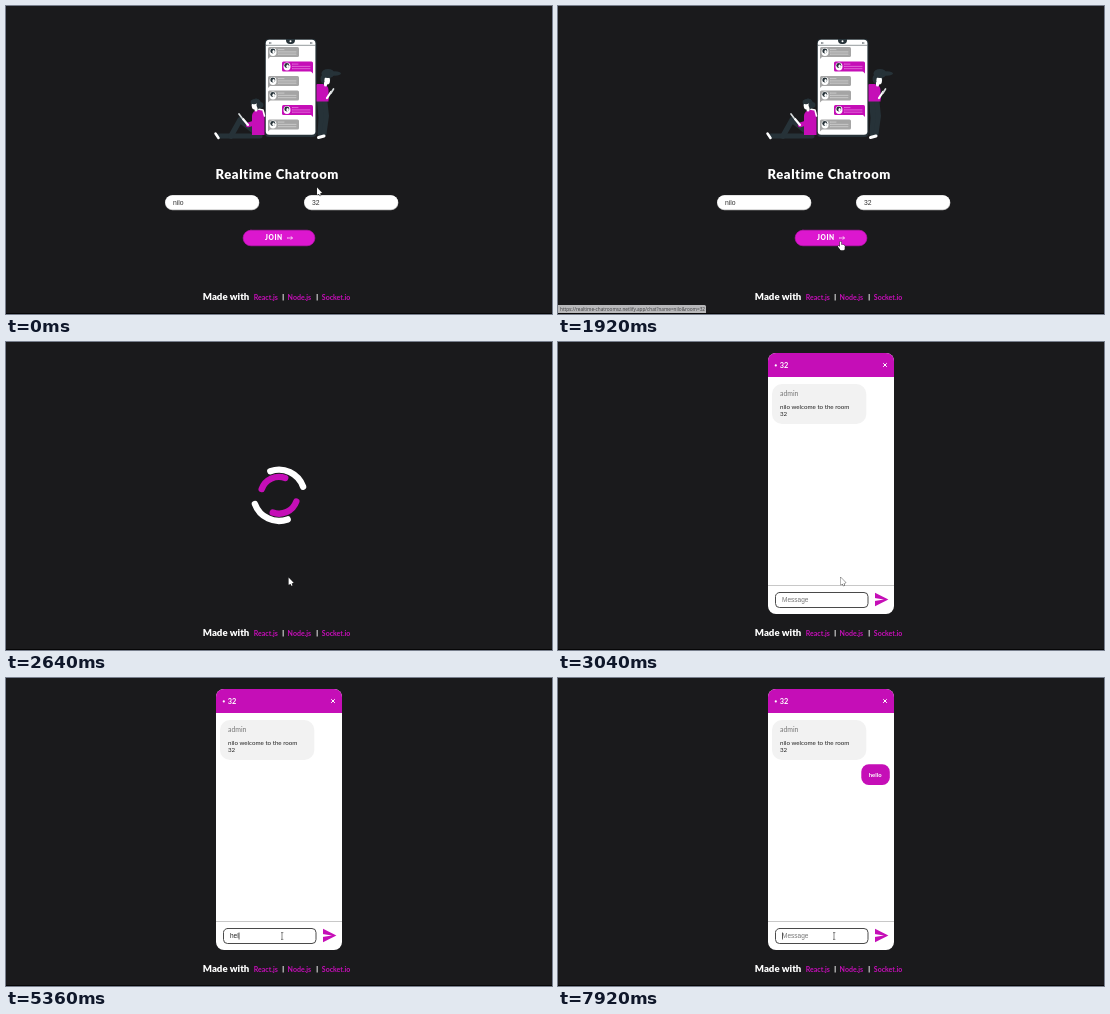
An HTML page with a canvas that plays this animation: 546 px wide and 308 px high, repeating every 8 s.

```html
<!DOCTYPE html>
<html lang="en">
<head>
<meta charset="utf-8">
<title>Realtime Chatroom</title>
<style>
html, body { margin: 0; width: 100%; height: 100%; overflow: hidden; background: #1a1a1c; }
canvas { display: block; width: 546px; height: 308px; }
</style>
</head>
<body>
<canvas id="stage"></canvas>
<script>
const W = 546, H = 308, LOOP = 8000;
const canvas = document.getElementById('stage');
const ctx = canvas.getContext('2d');
const ratio = window.devicePixelRatio || 1;
canvas.width = W * ratio;
canvas.height = H * ratio;

const BG = '#1a1a1c', PINK = '#c50eb7', INK = '#263238', WHITE = '#fff', GREY = '#a5a5a5';
const HUMAN = 'Lato, "Open Sans", sans-serif';
const SANS = '"Liberation Sans", Arial, sans-serif';
const USER = 'nilo', ROOM = '32', WORD = 'hello';

// Times of the events and the pause between keys, in ms
const AT = { status: 1840, loader: 2446, chat: 2880, focus: 4300, type: 4800, send: 6080 };
const KEY_GAP = 210, BLINK = 500;

const clamp = (value, low = 0, high = 1) => Math.min(high, Math.max(low, value));
const mix = (a, b, u) => a + (b - a) * u;

function box(x, y, w, h, r, fill, edge, width = 1) {
  ctx.beginPath();
  ctx.roundRect(x, y, w, h, r);
  ctx.fillStyle = fill;
  ctx.fill();
  if (!edge) return;
  ctx.strokeStyle = edge;
  ctx.lineWidth = width;
  ctx.stroke();
}

function text(str, x, y, font, color, spacing = 0) {
  ctx.font = font;
  ctx.letterSpacing = spacing + 'px';
  ctx.fillStyle = color;
  ctx.fillText(str, x, y);
}

function trace(points) {
  ctx.beginPath();
  points.forEach(([x, y]) => ctx.lineTo(x, y));
}

function poly(fill, ...points) {
  trace(points);
  ctx.fillStyle = fill;
  ctx.fill();
}

function line(color, width, ...points) {
  trace(points);
  ctx.lineCap = ctx.lineJoin = 'round';
  ctx.strokeStyle = color;
  ctx.lineWidth = width;
  ctx.stroke();
}

function oval(x, y, rx, ry, fill, turn = 0) {
  ctx.beginPath();
  ctx.ellipse(x, y, rx, ry, turn, 0, Math.PI * 2);
  ctx.fillStyle = fill;
  ctx.fill();
}

function miniMessage(y, mine) {
  const x = mine ? 276 : 262, fill = mine ? PINK : GREY;
  const tail = mine ? x + 31 : x, inward = mine ? -3 : 3;
  box(x, y, 31, 10, 1.5, fill);
  poly(fill, [tail, y + 8], [tail, y + 12], [tail + inward, y + 9]);
  oval(x + 5, y + 5, 3.5, 3.9, WHITE);
  oval(x + 4.8, y + 4, 2.5, 2.4, INK);
  oval(x + 5.6, y + 4.8, 1.2, 1.7, WHITE);
  for (let i = 0; i < 3; i++) {
    const row = y + 2.6 + i * 2.3;
    line(mine ? '#ee9be8' : '#dedede', 0.6, [x + 10, row], [x + (i ? 28 : 16), row]);
  }
}

function phone() {
  box(259, 33, 51.5, 98, 4, INK);
  box(259.8, 33.8, 49.6, 95, 3.5, WHITE);
  line(INK, 0.5, [260, 39.3], [309, 39.3]);
  line(INK, 0.8, [263, 37], [265, 37]);
  line(INK, 0.8, [304, 37], [306, 37]);
  box(280, 33, 9, 5, [0, 0, 4, 4], INK);
  oval(284.5, 35.2, 1, 1, WHITE);
  for (let i = 0; i < 6; i++) miniMessage(41 + i * 14.5, i % 3 === 1);
}

function head(x, y, tilt) {
  oval(x, y, 5, 5.5, INK);
  oval(x + tilt, y + 1.5, 2.8, 4, WHITE);
  line(WHITE, 3, [x, y + 4], [x, y + 6]);
}

function sitter() {
  line(INK, 5, [254, 130], [213, 130]);
  line(INK, 5.5, [253, 129], [234, 114], [225, 130]);
  line(WHITE, 2.5, [209.5, 127.5], [212.5, 132]);
  box(246, 104, 12.5, 25, [6, 4, 0, 0], PINK);
  line(PINK, 4.5, [249, 109], [248, 117], [242, 119]);
  line(WHITE, 2.2, [242, 119], [237, 113]);
  line('#d7dcdd', 1.7, [233, 108], [236, 112]);
  line(WHITE, 1.6, [252, 103], [257, 104], [258.5, 110]);
  head(250, 98, -1.5);
  oval(254, 99, 3.5, 3, INK);
  oval(249, 95.5, 4.5, 2.5, INK, -0.2);
}

function stander() {
  line(INK, 8, [315, 94], [316.5, 112], [315.5, 127]);
  line(INK, 5, [319, 96], [320.5, 110], [318, 128]);
  line(WHITE, 3, [312.5, 131.5], [318, 130]);
  box(310.5, 78, 12, 17.5, [1, 6, 0, 0], PINK);
  line(PINK, 4, [318, 83], [318, 91], [321, 92]);
  line(WHITE, 2.2, [321, 92], [325, 86]);
  line('#d7dcdd', 1.7, [325, 87], [327.5, 83]);
  head(319.5, 73, 1.7);
  oval(322, 67.5, 6.5, 4.5, INK);
  oval(329, 67.5, 6, 2.2, INK);
}

function field(x, value) {
  box(x, 189.2, 94.4, 15, 7.5, '#b5b5b5');
  box(x + 0.3, 189.2, 93.6, 14.4, 7.2, WHITE);
  text(value, x + 8, 198.6, '6.8px ' + SANS, '#333');
}

function joinPage(time) {
  phone();
  sitter();
  stander();
  text('Realtime Chatroom', 209.5, 173.3, '900 13px ' + HUMAN, WHITE, 0.6);
  field(159, USER);
  field(298, ROOM);
  box(237.1, 224.2, 71.8, 15.6, 7.8, '#dc17cf', '#c414b8', 0.6);
  text('JOIN', 259, 234.4, '900 6.6px ' + HUMAN, WHITE, 0.6);
  line(WHITE, 0.7, [281, 232], [286.4, 232]);
  line(WHITE, 0.7, [285, 230.6], [286.4, 232], [285, 233.4]);
  if (time >= AT.status) {
    box(0, 299, 148, 8, [0, 1.5, 0, 0], '#b8b8ba');
    text(`https://realtime-chatroomsz.netlify.app/chat?name=${USER}&room=${ROOM}`,
      2, 304.8, '4.7px "Open Sans", sans-serif', '#3c3c3e');
  }
}

function arcs(radius, start, color) {
  ctx.lineCap = 'round';
  ctx.lineWidth = 6.4;
  ctx.strokeStyle = color;
  for (const half of [0, Math.PI]) {
    ctx.beginPath();
    ctx.arc(273, 153.3, radius, start + half, start + half + Math.PI / 2);
    ctx.stroke();
  }
}

function loader(time) {
  const turn = (time - AT.loader) / 1000 * Math.PI * 2;
  arcs(25.6, turn, WHITE);
  arcs(18.4, Math.PI / 2 - turn, PINK);
}

function chatPage(time) {
  box(210, 11, 126, 261, 8, WHITE);
  box(210, 11, 126, 24, [8, 8, 0, 0], PINK);
  oval(217.8, 23.4, 1.1, 1.1, WHITE);
  text(ROOM, 221.8, 25.8, 'bold 7.4px ' + HUMAN, WHITE);
  line(WHITE, 1, [325.4, 21.4], [328.6, 24.6]);
  line(WHITE, 1, [328.6, 21.4], [325.4, 24.6]);

  box(214, 42, 94.3, 40, 10, '#f2f2f2');
  text('admin', 222, 54.2, '6.9px ' + HUMAN, '#777');
  text(USER + ' welcome to the room', 222, 66.8, '6.2px ' + HUMAN, '#222');
  text(ROOM, 222, 74.2, '6.2px ' + HUMAN, '#222');

  const sent = time >= AT.send;
  if (sent) {
    box(303.3, 86.3, 28.5, 20.7, 7.5, PINK);
    text(WORD, 310.8, 98.9, 'bold 5.9px ' + HUMAN, WHITE);
  }
  box(210, 243, 126, 1, 0, '#c8c8c8');
  messageBar(time, sent);
}

function messageBar(time, sent) {
  box(217.5, 250.5, 92.5, 15, 4, WHITE, '#4a4a4a');
  const keys = clamp(Math.floor((time - AT.type) / KEY_GAP) + 1, 0, WORD.length);
  const typed = sent ? '' : WORD.slice(0, keys);
  text(typed || 'Message', 224, 260.3, '6.5px ' + SANS, typed ? '#222' : '#777');

  // Every key press starts the caret's blink anew
  const reset = keys ? AT.type + (keys - 1) * KEY_GAP : AT.focus;
  if (time >= AT.focus && (time - reset) % (2 * BLINK) < BLINK) {
    const x = 224 + (typed ? ctx.measureText(typed).width : 0);
    box(x, 254.4, 0.7, 7.2, 0, '#222');
  }
  poly(PINK, [317, 250.8], [330.4, 257.5], [317, 264.2]);
  poly(WHITE, [316.5, 256], [326, 257.5], [316.5, 259]);
}

function footer() {
  text('Made with', 196.8, 294.2, '900 9.6px ' + HUMAN, WHITE);
  const link = (name, x) => text(name, x, 293.6, 'bold 7px ' + HUMAN, PINK);
  link('React.js', 247.8);
  link('Node.js', 281.6);
  link('Socket.io', 315.8);
  box(276.7, 288, 0.9, 6.5, 0, WHITE);
  box(310.7, 288, 0.9, 6.5, 0, WHITE);
  box(0, 307, W, 1, 0, '#060607');
}

function arrow() {
  line('#222', 2, [2, 5], [3.2, 7.6]);
  ctx.beginPath();
  ctx.moveTo(0, 0);
  ctx.lineTo(0, 7.2);
  ctx.lineTo(5, 5.2);
  ctx.closePath();
  ctx.fillStyle = WHITE;
  ctx.strokeStyle = '#222';
  ctx.lineWidth = 0.6;
  ctx.stroke();
  ctx.fill();
  line(WHITE, 1.1, [2, 5], [3.2, 7.6]);
}

function hand() {
  for (const [color, grow] of [['#222', 0.4], [WHITE, 0]]) {
    line(color, 1.4 + grow * 2, [0, 0.7], [0, 5]);
    line(color, 1.4 + grow * 2, [-1.9, 5], [0, 7.2]);
    box(-0.7 - grow, 3.2 - grow, 4.8 + grow * 2, 5.4 + grow * 2, 1.5, color);
  }
}

function textBeam() {
  line('#555', 0.7, [0, -3.4], [0, 3.4]);
  for (const y of [-3.4, 3.4]) line('#555', 0.6, [-1, y], [1, y]);
}

function pointer(time) {
  const down = Math.pow(clamp((time - 160) / 1700), 1.5);
  const across = clamp((time - 3560) / 600);
  const ease = across * across * (3 - 2 * across);
  const x = mix(mix(311, 282.6, down), 276, ease);
  const y = mix(mix(181.6, 235.6, down), 258, ease);
  const overButton = time < AT.loader && y > 224;
  const overInput = time >= AT.chat && y > 250;
  const shape = overInput ? textBeam : overButton ? hand : arrow;
  ctx.save();
  ctx.translate(x, y);
  shape();
  ctx.restore();
}

function draw(time) {
  ctx.setTransform(ratio, 0, 0, ratio, 0, 0);
  ctx.fillStyle = BG;
  ctx.fillRect(0, 0, W, H);
  footer();
  if (time < AT.loader) joinPage(time);
  else if (time < AT.chat) loader(time);
  else chatPage(time);
  pointer(time);
}

const begin = performance.now();
function tick() {
  draw((performance.now() - begin) % LOOP);
  requestAnimationFrame(tick);
}
tick();
</script>
</body>
</html>
```
